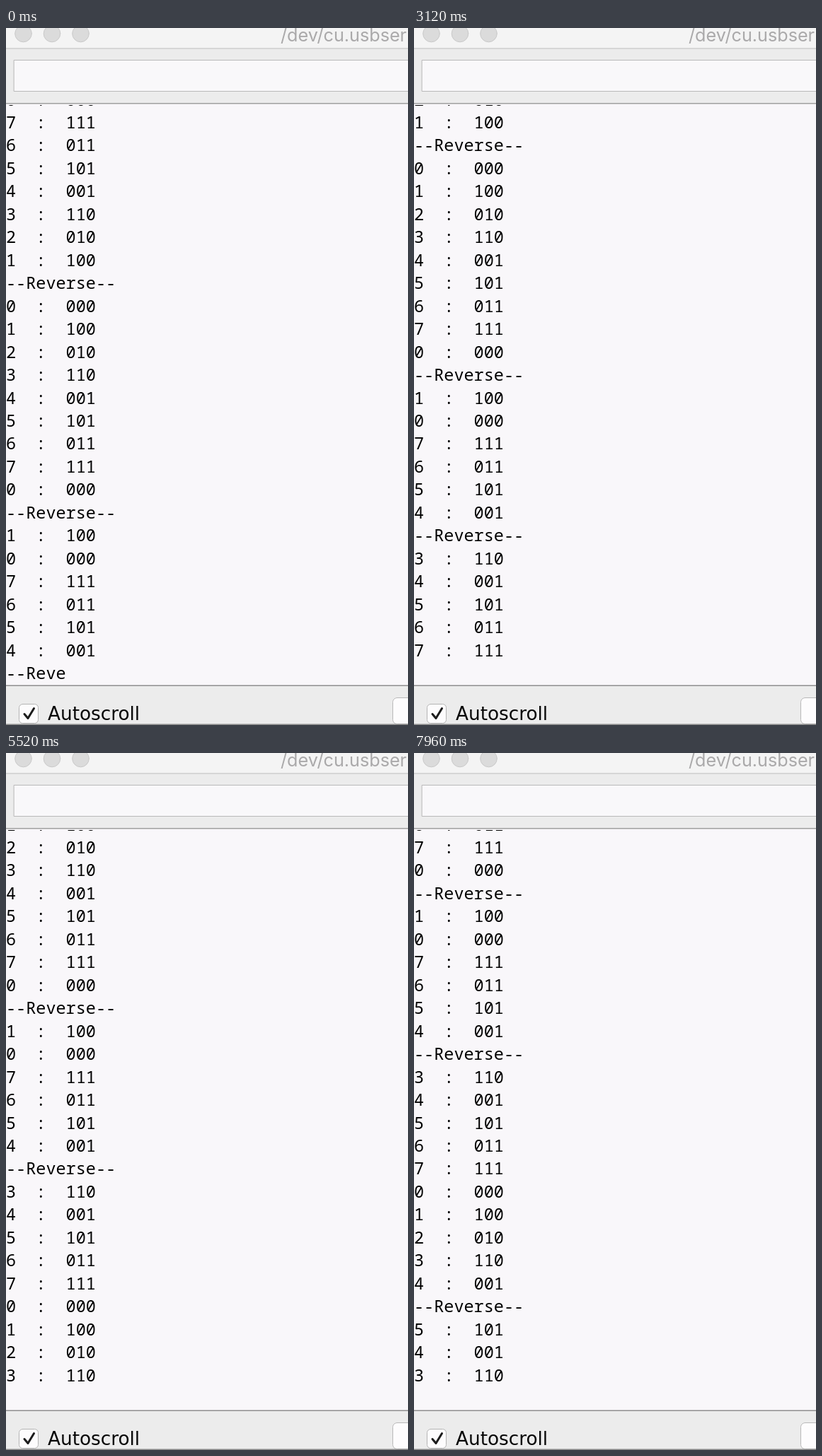
Write an HTML page with a canvas that moves like this. It is 568 px wide and 986 px high and loops after 8000 ms.

```html
<!DOCTYPE html>
<html lang="en">
<head>
<meta charset="utf-8">
<title>Serial monitor</title>
<style>
  html, body { margin: 0; width: 100%; height: 100%; overflow: hidden; background: #f9f7fa; }
  canvas { display: block; }
</style>
</head>
<body>
<canvas id="stage" width="568" height="986"></canvas>
<script>
const W = 568, H = 986, LOOP = 8000;
const ctx = document.getElementById('stage').getContext('2d');

const BOTTOM_ROW = 24, BASELINE = 142, PITCH = 32.46;
const TYPING = 0.07; // share of each line's time spent typing, at its end

// Pace of the log: [ms, lines printed], linear in between.
const PACE = [
  [0, 25.955], [80, 27], [1300, 28], [1920, 29],
  [4900, 34], [6150, 37], [6200, 38], [7440, 40], [LOOP, 40.85]
];

// A 3-bit counter: after each reversal it takes one more step, then turns.
function buildLog(runs) {
  const lines = [];
  let value = -1, dir = 1;
  for (const length of runs) {
    if (lines.length) lines.push('--Reverse--');
    for (let i = 0; i < length; i++) {
      value = (value + dir) & 7;
      if (i === 0) dir = -dir;
      const bits = [0, 1, 2].map(b => (value >> b) & 1).join('');
      lines.push(`${value}  :  ${bits}`);
    }
  }
  return lines;
}

const LOG = buildLog([8, 9, 6, 10, 4]);

function progress(t) {
  const k = PACE.findIndex(p => t < p[0]);
  const [t0, a] = PACE[k - 1], [t1, b] = PACE[k];
  return a + (b - a) * (t - t0) / (t1 - t0);
}

function rect(x, y, w, h, color) {
  ctx.fillStyle = color;
  ctx.fillRect(x, y, w, h);
}

function paint(fill, stroke) {
  ctx.fillStyle = fill;
  ctx.fill();
  ctx.strokeStyle = stroke;
  ctx.lineWidth = 1;
  ctx.stroke();
}

function box(x, y, w, h, r, fill, stroke) {
  ctx.beginPath();
  ctx.roundRect(x, y, w, h, r);
  paint(fill, stroke);
}

function text(str, x, y, font, color) {
  ctx.font = font;
  ctx.fillStyle = color;
  ctx.fillText(str, x, y);
}

function drawTop() {
  rect(0, 0, W, 29, '#f4f4f4');
  rect(0, 28, W, 2, '#d6d6d6');
  rect(0, 30, W, 76, '#ececec');
  for (let i = 0; i < 3; i++) {
    ctx.beginPath();
    ctx.arc(24.5 + i * 40.5, 8, 11.8, 0, 2 * Math.PI);
    paint('#dbdbdb', '#c9c9c9');
  }
  text('/dev/cu.usbser', 388, 18.5, '25.2px Inter, sans-serif', '#aaa9aa');
  box(11.5, 45.5, W, 44, 0, '#f9f8fa', '#b9b9b9');
  rect(0, 106, W, 1.5, '#a0a0a0');
}

function drawBottom() {
  rect(0, 930, W, 56, '#ececec');
  rect(0, 929.5, W, 1.5, '#8e8e8e');
  box(18.5, 956.5, 27, 27, 5, '#fdfcfd', '#b4b4b4');
  ctx.beginPath();
  ctx.moveTo(26, 970.5);
  ctx.lineTo(31, 976.5);
  ctx.lineTo(39.5, 962.5);
  ctx.strokeStyle = '#1c1c1c';
  ctx.lineWidth = 3;
  ctx.lineCap = ctx.lineJoin = 'round';
  ctx.stroke();
  text('Autoscroll', 59, 979, '26.3px "DejaVu Sans", sans-serif', '#080808');
  box(546.5, 947.5, 60, 37, 6, '#fdfcfd', '#b9b9b9');
  rect(0, 984.5, W, 1.5, '#8a8a8a');
}

function drawLog(t) {
  const pos = progress(t);
  const cursor = Math.floor(pos);
  const typed = Math.max(0, (pos - cursor - 1 + TYPING) / TYPING);
  const font = '23.5px "Noto Sans Mono", monospace';
  ctx.save();
  ctx.beginPath();
  ctx.rect(0, 109, W, 820);
  ctx.clip();
  for (let row = -1; row <= BOTTOM_ROW; row++) {
    const i = cursor - BOTTOM_ROW + row;
    const line = LOG[i] || '';
    const shown = i === cursor ? line.slice(0, Math.ceil(typed * line.length)) : line;
    text(shown, 0, BASELINE + row * PITCH, font, '#000');
  }
  ctx.restore();
}

function frame() {
  rect(0, 0, W, H, '#f9f7fa');
  drawTop();
  drawLog(performance.now() % LOOP);
  drawBottom();
  requestAnimationFrame(frame);
}
frame();
</script>
</body>
</html>
```
